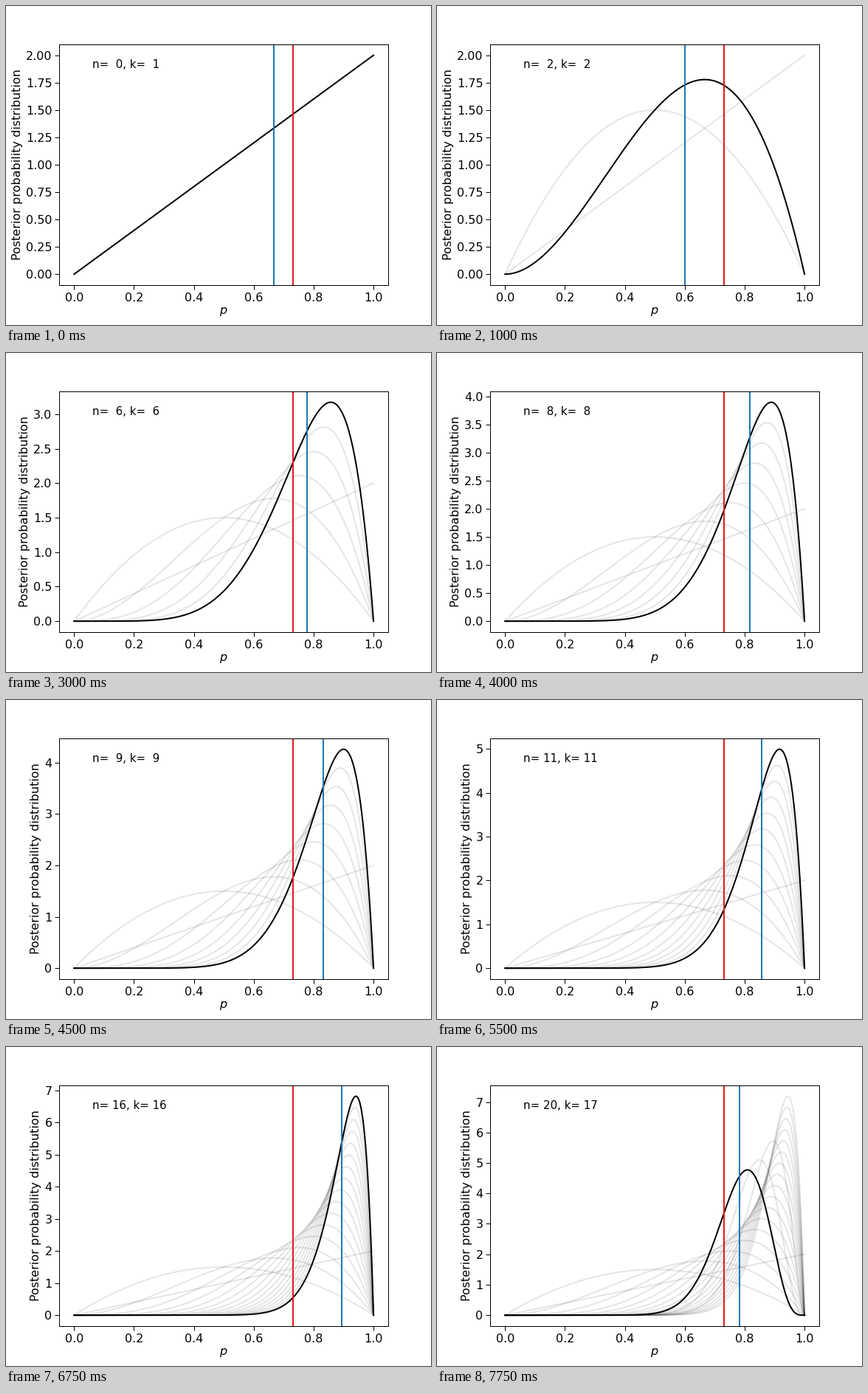
Recreate the animation shown at these times as a matplotlib script. Size 576 by 432 pixels, loop 8 s.

```python
from math import gamma

import matplotlib.pyplot as plt
import numpy as np
from matplotlib.animation import FuncAnimation

plt.rcParams.update({
    "font.family": "DejaVu Sans",
    "font.size": 16,
    "axes.linewidth": 1,
    "xtick.major.size": 6,
    "ytick.major.size": 6,
    "xtick.major.width": 1,
    "ytick.major.width": 1,
})

STEP_MS = 250
FRAMES = 32
SLOW_FRAMES = 22      # each trial lasts two steps up to here, then one
MAX_SUCCESSES = 17    # every later trial fails
TRUE_P = 0.731

p = np.linspace(0, 1, 500)


def beta_params(n):
    k = successes(n)
    return k + 1, n - k + 2


def successes(n):
    return max(1, min(n, MAX_SUCCESSES))


def posterior(n):
    a, b = beta_params(n)
    scale = gamma(a + b) / (gamma(a) * gamma(b))
    return scale * p ** (a - 1) * (1 - p) ** (b - 1)


def posterior_mean(n):
    a, b = beta_params(n)
    return a / (a + b)


fig = plt.figure(figsize=(8, 6), dpi=72, facecolor="white")
ax = fig.add_axes([0.125, 0.125, 0.775, 0.755])


def draw(frame):
    n = frame // 2 if frame < SLOW_FRAMES else frame - SLOW_FRAMES // 2
    ax.clear()
    for past in range(n):
        ax.plot(p, posterior(past), color="black", lw=2, alpha=0.1)
    ax.plot(p, posterior(n), color="black", lw=2)
    ax.axvline(TRUE_P, color="#e31a1c", lw=2)
    ax.axvline(posterior_mean(n), color="#1f77b4", lw=2)
    ax.text(0.1, 0.9, f"n={n:3d}, k={successes(n):3d}", fontsize=15,
            transform=ax.transAxes)
    ax.set_xlabel("$p$")
    ax.set_ylabel("Posterior probability distribution")
    return ax.get_children()


anim = FuncAnimation(fig, draw, frames=FRAMES, init_func=lambda: draw(0),
                     interval=STEP_MS, repeat=True, repeat_delay=0)
plt.show()
```
